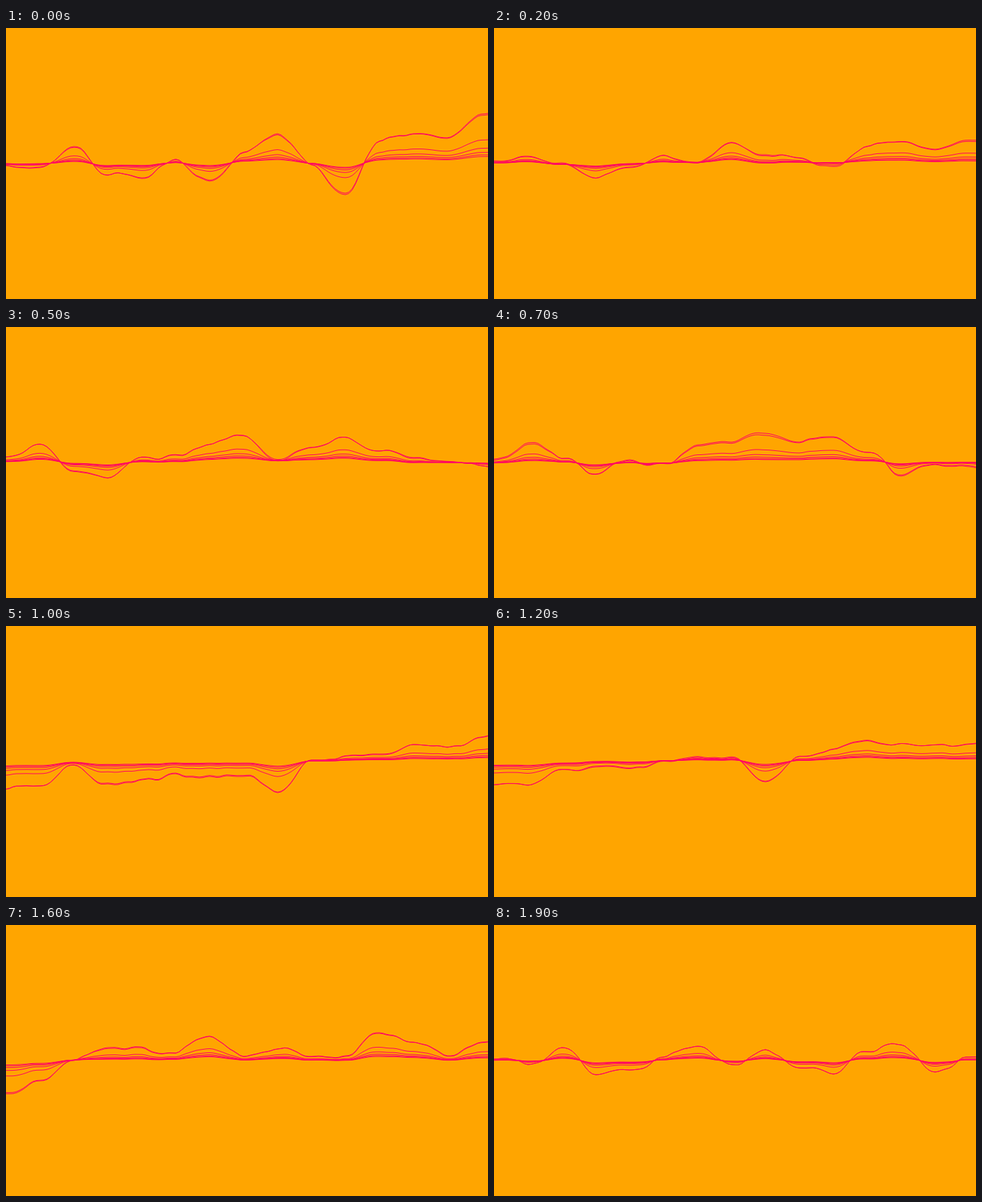
Animation, 710 px wide and 400 px high, one loop 2000 ms. Source, as an HTML page with a canvas:

```html
<!DOCTYPE html>
<html lang="en">
<head>
<meta charset="utf-8">
<title>Layered wave</title>
<style>
  html, body { margin: 0; width: 100%; height: 100%; overflow: hidden; background: #ffa500; }
  canvas { display: block; }
</style>
</head>
<body>
<canvas id="stage" width="710" height="400"></canvas>
<script>
const ctx = document.getElementById('stage').getContext('2d');
const WIDTH = 710, HEIGHT = 400, MIDDLE = 200, SPACING = 5;
const LOOP = 2000, STEP = 100;
const LAYERS = 6, LAYER_DRIFT = 0.1;
const LATTICE = 50;
const poses = [];

function seededRandom(seed) {
  return () => {
    seed = (seed * 16807) % 2147483647;
    return seed / 2147483647;
  };
}

// Cosine interpolation between evenly spaced heights.
function wave(heights, spacing, x) {
  const i = Math.floor(x / spacing);
  const mix = (1 - Math.cos(Math.PI * (x / spacing - i))) / 2;
  const a = heights[i], b = heights[i + 1] ?? a;
  return a + (b - a) * mix;
}

// Ripples that leave the main lattice points where they are.
function ripple(spacing, size, random) {
  const count = Math.ceil(WIDTH / spacing) + 1;
  return Array.from({ length: count }, (_, i) => i % 2 * (random() * 2 - 1) * size);
}

// Main heights, above the middle when negative, with two finer octaves.
function pose(step, ...heights) {
  const random = seededRandom(4711 + step * 97);
  const medium = ripple(LATTICE / 2, 5, random);
  const fine = ripple(LATTICE / 4, 2.5, random);
  const offsets = [];
  for (let x = 0; x <= WIDTH; x += SPACING) {
    offsets.push(wave(heights, LATTICE, x)
      + wave(medium, LATTICE / 2, x) + wave(fine, LATTICE / 4, x));
  }
  poses.push({ step, offsets });
}

pose(0, 3, 6, -25, 17, 22, -6, 26, -16, -44, 2, 46, -33, -44, -38, -73);
pose(4, -10, -26, 23, 26, -10, -18, -27, -45, 18, -18, -37, -18, -21, -4, 4);
pose(7, -5, -29, -6, 17, -4, 1, -26, -30, -43, -30, -38, -15, 20, 3, 6);
pose(10, 41, 36, 5, 33, 27, 18, 22, 22, 46, -2, -8, -10, -25, -21, -36);
pose(14, 28, 34, 18, -17, -6, -19, -34, -33, 14, -13, -28, -51, -28, -28, -16);
pose(16, 49, 30, 0, -19, -20, -11, -36, -6, -17, -6, -7, -41, -27, -7, -27);
pose(19, -2, 6, -19, 21, 14, -5, -21, 6, -16, 11, 20, -13, -23, 17, -5);

function offsetsAt(step) {
  const next = poses.findIndex(p => p.step > step);
  if (next < 0) return poses[poses.length - 1].offsets;
  const a = poses[next - 1], b = poses[next];
  const mix = (step - a.step) / (b.step - a.step);
  return a.offsets.map((y, i) => y + (b.offsets[i] - y) * mix);
}

function drawLine(offsets, scale) {
  ctx.beginPath();
  offsets.forEach((y, i) => ctx.lineTo(i * SPACING, MIDDLE + y * scale));
  ctx.stroke();
}

function draw() {
  const step = Math.floor(performance.now() % LOOP / STEP);
  ctx.fillStyle = '#ffa500';
  ctx.fillRect(0, 0, WIDTH, HEIGHT);
  ctx.strokeStyle = '#ff0066';
  ctx.lineWidth = 1;
  // Each flatter layer runs slightly ahead in time.
  for (let layer = 0; layer <= LAYERS; layer++) {
    drawLine(offsetsAt(step + layer * LAYER_DRIFT), 1 / Math.max(1, layer));
  }
  requestAnimationFrame(draw);
}
draw();
</script>
</body>
</html>
```
